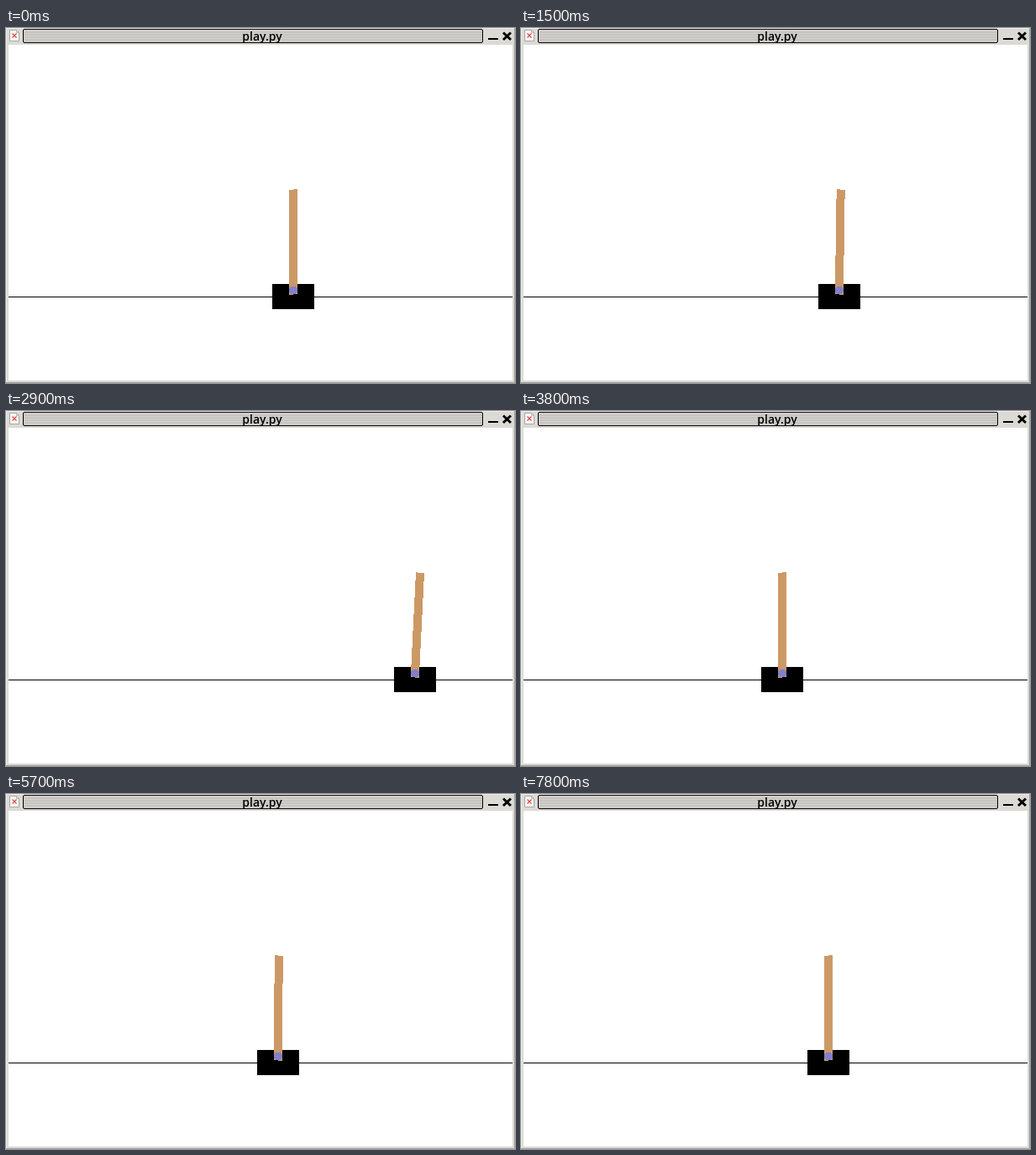
These frames come from a looping animation (606 by 423 pixels, 8000 ms). An HTML page with a canvas:

```html
<!DOCTYPE html>
<html lang="en">
<head>
<meta charset="utf-8">
<title>play.py</title>
<style>
  html, body { margin: 0; width: 100%; height: 100%; overflow: hidden; background: #dcdad5; }
  canvas { position: absolute; left: 0; top: 0; display: block; }
  #title {
    position: absolute; left: 20px; top: 0; width: 570px; height: 19px;
    font: 600 14px/19px "Open Sans", "Noto Sans", sans-serif;
    color: #000; text-align: center;
  }
</style>
</head>
<body>
<canvas id="stage" width="606" height="423"></canvas>
<div id="title">play.py</div>
<script>
const ctx = document.getElementById('stage').getContext('2d');
const LOOP = 8000, STEP = 100;
const VIEW = { x: 3, y: 20, w: 600, h: 400 };
const TRACK_Y = 320, AXLE_Y = 312.5, POLE_TOP = 120, HALF = 5;

// Steps on which the display skips an update
const HOLDS = [25, 37, 39, 44, 63, 74, 79];

// Two episodes; keys are [step, cart left edge] and [step, pole lean in radians]
const EPISODES = [
  {
    start: 0,
    cart: [[0, 317], [9, 337], [15, 353.88], [18, 372], [24, 409], [29, 462], [33, 556]],
    lean: [[0, -0.002], [9, 0.006], [15, 0.0149], [24, 0.032], [29, 0.05], [33, 0.07]]
  },
  {
    start: 34,
    cart: [[34, 285], [36, 285.2], [38, 286], [43, 290], [53, 296], [57, 299],
           [62, 308], [70, 319], [72, 323], [73, 326.3], [78, 341]],
    lean: [[34, -0.007], [36, -0.005], [38, -0.002], [48, 0.003], [57, 0.0058],
           [63, 0.004], [70, -0.002], [78, -0.003]]
  }
];

function rect(color, x, y, w, h) {
  ctx.fillStyle = color;
  ctx.fillRect(x, y, w, h);
}

function stroke(color, width, ...lines) {
  ctx.strokeStyle = color;
  ctx.lineWidth = width;
  ctx.beginPath();
  for (const [x1, y1, x2, y2] of lines) {
    ctx.moveTo(x1, y1);
    ctx.lineTo(x2, y2);
  }
  ctx.stroke();
}

// Smooth cubic through the keys
function curve(keys, s) {
  const last = keys.length - 1;
  if (s <= keys[0][0]) return keys[0][1];
  if (s >= keys[last][0]) return keys[last][1];
  let i = 0;
  while (s > keys[i + 1][0]) i++;
  const slope = k => {
    const a = keys[Math.max(k - 1, 0)], b = keys[Math.min(k + 1, last)];
    return (b[1] - a[1]) / (b[0] - a[0]);
  };
  const [t0, v0] = keys[i], [t1, v1] = keys[i + 1];
  const d = t1 - t0, u = (s - t0) / d, w = 1 - u;
  return v0 * w * w * (1 + 2 * u) + v1 * u * u * (3 - 2 * u)
       + d * u * w * (slope(i) * w - slope(i + 1) * u);
}

// Fill every pixel whose centre passes the test, without smoothing
function fillPixels(color, x0, y0, x1, y1, inside) {
  ctx.fillStyle = color;
  for (let y = y0; y < y1; y++) {
    let from = -1;
    for (let x = x0; x <= x1; x++) {
      const hit = x < x1 && inside(x + 0.5, y + 0.5);
      if (hit && from < 0) from = x;
      if (!hit && from >= 0) {
        ctx.fillRect(from, y, x - from, 1);
        from = -1;
      }
    }
  }
}

function drawWindow() {
  rect('#dcdad5', 0, 0, 606, 423);
  rect('#eeedea', 0, 0, 606, 1);
  rect('#eeedea', 0, 0, 1, 423);
  rect('#a5a39f', 605, 0, 1, 423);
  rect('#a5a39f', 0, 422, 606, 1);

  // Striped title bar
  rect('#dedcd8', 20, 1, 548, 17);
  for (let y = 3; y < 17; y += 2) rect('#b9b7b3', 21, y, 546, 1);
  ctx.strokeStyle = '#000';
  ctx.lineWidth = 1;
  ctx.beginPath();
  ctx.roundRect(20.5, 1.5, 547, 16, 1.5);
  ctx.stroke();

  // Page icon
  ctx.beginPath();
  ctx.moveTo(4.5, 2.5);
  ctx.lineTo(12.5, 2.5);
  ctx.lineTo(15.5, 5.5);
  ctx.lineTo(15.5, 15.5);
  ctx.lineTo(4.5, 15.5);
  ctx.closePath();
  ctx.fillStyle = '#f7f7f5';
  ctx.fill();
  ctx.strokeStyle = '#a8a8a4';
  ctx.stroke();
  stroke('#b8b8b4', 1, [12.5, 2.5, 12.5, 5.5], [12.5, 5.5, 15.5, 5.5]);
  stroke('#e04a48', 1.2, [7.5, 6.5, 12.5, 11.5], [12.5, 6.5, 7.5, 11.5]);

  // Minimise and close buttons
  rect('#000', 574, 12, 12, 2);
  stroke('#000', 3, [592, 5.5, 601, 14], [601, 5.5, 592, 14]);
}

function drawScene(left, lean) {
  const cx = left + 25, sin = Math.sin(lean), cos = Math.cos(lean);
  const x0 = Math.floor(cx) - 10;
  rect('#fff', VIEW.x, VIEW.y, VIEW.w, VIEW.h);
  rect('#000', Math.round(left), TRACK_Y - 15, 50, 30);
  fillPixels('#cc9966', x0, 188, x0 + 40, 322, (x, y) => {
    const dx = x - cx, dy = AXLE_Y - y;
    const across = dx * cos - dy * sin, along = dx * sin + dy * cos;
    return across >= -HALF && across < HALF && along >= -HALF && along <= POLE_TOP;
  });
  fillPixels('#8080cc', x0, 306, x0 + 20, 319,
    (x, y) => Math.hypot(x - cx, y - AXLE_Y) <= HALF);
  rect('#000', VIEW.x, TRACK_Y, VIEW.w, 1);
}

function draw(ms) {
  let step = Math.floor((ms % LOOP) / STEP);
  if (HOLDS.includes(step)) step--;
  const ep = EPISODES[step < EPISODES[1].start ? 0 : 1];
  drawWindow();
  ctx.save();
  ctx.beginPath();
  ctx.rect(VIEW.x, VIEW.y, VIEW.w, VIEW.h);
  ctx.clip();
  drawScene(curve(ep.cart, step), curve(ep.lean, step));
  ctx.restore();
}

const begin = performance.now();
function tick() {
  draw(performance.now() - begin);
  requestAnimationFrame(tick);
}
tick();
</script>
</body>
</html>
```
